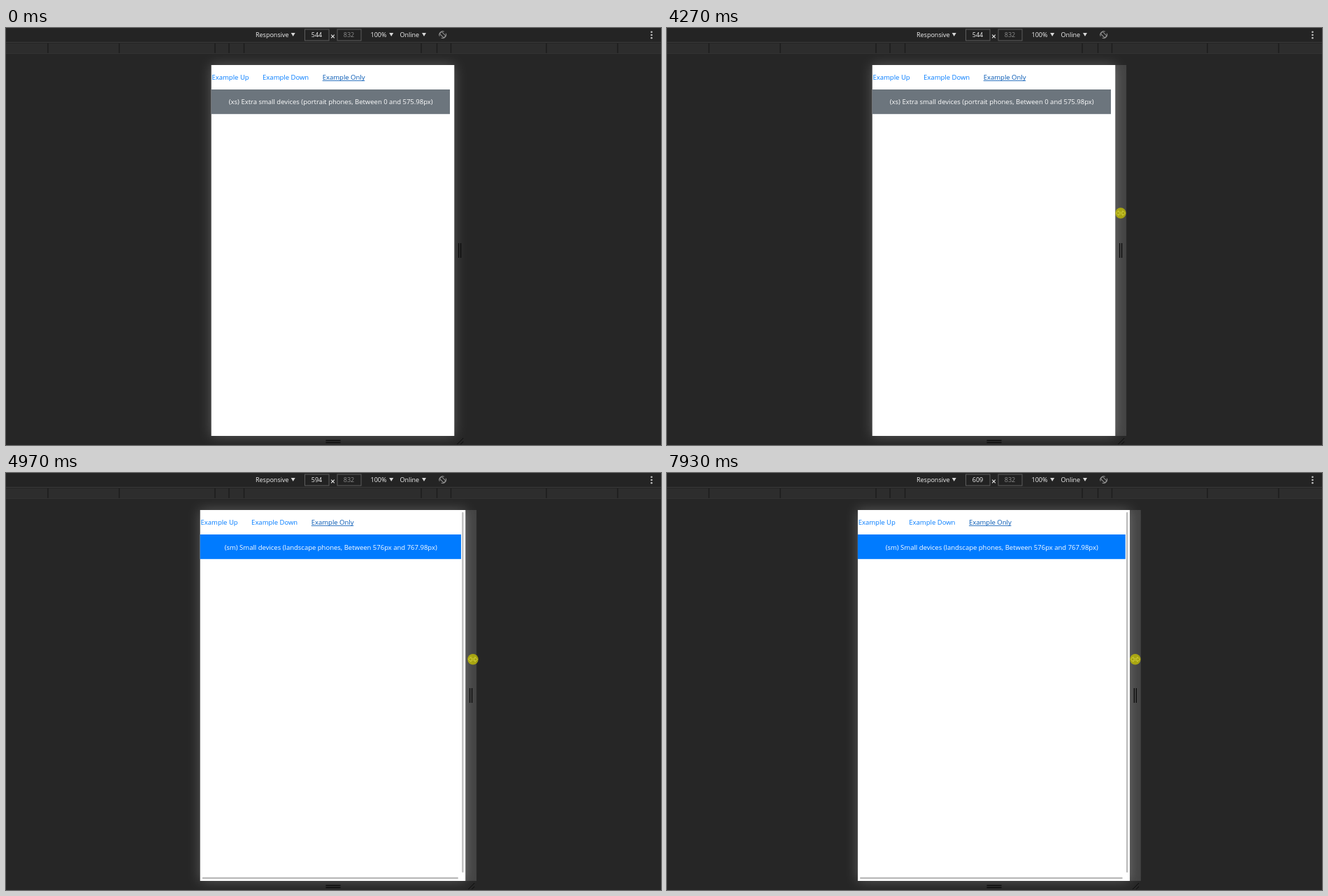
An HTML page for the animation above (8000 ms loop, 937 by 597 pixels).

```html
<!DOCTYPE html>
<html lang="en">
<head>
<meta charset="utf-8">
<title>Responsive breakpoints</title>
<style>
  html, body { margin: 0; width: 100%; height: 100%; overflow: hidden; background: #262626; }
  svg { display: block; width: 100%; height: 100%; }
  text { font: 9.5px "Open Sans", "Noto Sans", sans-serif; }
  .bar text { font-size: 9px; fill: #f2f2f2; }
  .mid { text-anchor: middle; }
  .links text { fill: #007bff; }
  .links .hover { fill: #0056b3; }
  .field { fill: #222; stroke: #5c5c5c; }
  .grip { stroke: #0c0c0c; fill: none; }
  .thumb { fill: #b9b9b9; }
</style>
</head>
<body>
<svg viewBox="0 0 937 597">
  <defs>
    <filter id="blur" filterUnits="userSpaceOnUse" x="200" y="0" width="540" height="650">
      <feGaussianBlur stdDeviation="9"/>
    </filter>
  </defs>
  <rect width="937" height="597" fill="#262626"/>
  <rect id="glow" y="53" height="531" fill="#fff" opacity=".24" filter="url(#blur)"/>

  <g class="bar">
    <rect width="937" height="37" fill="#242424"/>
    <path d="M0 20.5H937" stroke="#3b3b3b"/>
    <rect y="22" width="937" height="14" fill="#2d2d2d"/>
    <path d="M0 36.5H937" stroke="#333"/>
    <path id="ticks" stroke="#1b1b1b" stroke-width="1.3"/>
    <text x="357" y="13.3">Responsive</text>
    <text x="521.5" y="13.3">100%</text>
    <text x="563.5" y="13.3">Online</text>
    <path d="M407.7 7h6l-3 5zM548.2 7h6l-3 5zM595 7h6l-3 5z" fill="#d8d8d8"/>
    <rect class="field" x="427.5" y="2" width="34.5" height="16"/>
    <rect class="field" x="474" y="2" width="34" height="16"/>
    <text id="size" class="mid" x="444.5" y="13.3"></text>
    <text class="mid" x="490.5" y="13.3" style="fill:#8c8c8c">832</text>
    <path d="M465.2 9.7l4.6 4.6m0-4.6l-4.6 4.6" stroke="#e4e4e4" stroke-width="1.2"/>
    <g transform="translate(624.7 9.7)" fill="none" stroke="#9a9a9a">
      <path d="M-4.6 2A5 5 0 0 1 2 -4.6M4.6 -2A5 5 0 0 1 -2 4.6"/>
      <rect x="-2" y="-4.2" width="4" height="8.4" rx=".6" transform="rotate(-45)"/>
    </g>
    <g fill="#c4c4c4">
      <circle cx="923.5" cy="5.8" r="1.3"/><circle cx="923.5" cy="10" r="1.3"/><circle cx="923.5" cy="14.2" r="1.3"/>
    </g>
  </g>

  <g class="grip">
    <path d="M457.5 590.5h21m-21 3h21" stroke-width="1.3"/>
  </g>
  <g id="right">
    <rect id="track" y="53" width="15.8" height="531" fill="#fff" opacity=".13"/>
    <path class="grip" d="M6.3 308v21m3-21v21" stroke-width="1.3"/>
    <path class="grip" d="M4 596l9-9m-4 9l4-4"/>
  </g>

  <rect id="page" y="53" height="531" fill="#fff"/>
  <rect id="alert" y="88" height="35.2"/>
  <text id="label" class="mid" x="464.7" fill="#fff"></text>
  <g id="links" class="links">
    <text x=".8" y="74">Example Up</text>
    <text x="73.4" y="74">Example Down</text>
    <text class="hover" x="159" y="74">Example Only</text>
    <path d="M159 75.5h60.5" stroke="#0056b3" stroke-width=".8"/>
  </g>
  <g id="scroll">
    <rect id="vThumb" class="thumb" y="56" width="2.2" height="516" rx="1.1"/>
    <rect id="hThumb" class="thumb" y="578.8" height="2.2" rx="1.1"/>
  </g>

  <path id="arrow" d="M.5 .5V10.3L2.8 8.2L4.4 11.7L6 11L4.4 7.6H7.5Z" fill="#fff" stroke="#111" stroke-width=".6"/>
  <g id="resize">
    <path d="M-6.5 0L-2.8 -3.4V-1H2.8V-3.4L6.5 0L2.8 3.4V1H-2.8V3.4Z" fill="#2c2c2c" stroke="#fff" stroke-width=".9"/>
    <circle id="press" r="7.7" fill="#c8c400" opacity=".75"/>
  </g>
</svg>
<script>
const LOOP = 8000, SCALE = 0.639, CENTER = 467.5;
const $ = id => document.getElementById(id);
const set = (id, attrs) => {
  for (const name in attrs) $(id).setAttribute(name, attrs[name]);
};
const show = (id, on) => $(id).setAttribute('visibility', on ? 'visible' : 'hidden');
const mix = (a, b, u) => a + (b - a) * u;

$('ticks').setAttribute('d',
  [60, 162, 299, 319, 340.5, 594, 616.5, 636.5, 773, 875].map(x => `M${x} 22v14`).join(''));

// time, viewport width, pointer x, pointer y
const drag = [
  [0, 544, 649, 265],
  [4500, 547, 650, 265],
  [4580, 555, 653, 265.5],
  [4660, 564, 656, 266],
  [4740, 572, 658.8, 266.5],
  [4820, 580, 662, 266.8],
  [4900, 588, 665, 266.8],
  [4970, 594, 668, 266.8],
  [5140, 604, 668, 266.8],
  [7780, 605, 668.6, 266.8],
  [7850, 607, 669.2, 266.8],
  [7930, 609, 669.9, 266.8]
];

// Pointer enters from the right, rests, then settles on the resize handle.
function approach(t) {
  if (t < 1310) {
    const u = Math.min(5, Math.floor((t - 700) / 76)) / 5;
    return [mix(907, 752, u), mix(212, 250, u)];
  }
  const u = Math.min(11, Math.floor((t - 1310) / 79) + 1) / 11;
  const eased = 1 - (1 - u) ** 2;
  return [mix(752, 649, eased), mix(250, 265, eased)];
}

function scrollOpacity(t) {
  if (t < 4500 || (t >= 5670 && t < 7780)) return 0;
  return t >= 5520 && t < 5670 ? 0.5 : 1;
}

function draw(t) {
  let [, size, x, y] = drag.findLast(step => t >= step[0]);
  if (t >= 700 && t < 2100) [x, y] = approach(t);
  const width = size * SCALE, left = CENTER - width / 2, right = left + width;
  const small = size >= 576;
  const onHandle = t >= 1310 && x < 657 || t >= 2100;

  $('size').textContent = size;
  set('glow', { x: left, width });
  set('page', { x: left, width });
  set('alert', { x: left, width: width - 6.3, fill: small ? '#007bff' : '#6c757d' });
  $('label').textContent = small
    ? '(sm) Small devices (landscape phones, Between 576px and 767.98px)'
    : '(xs) Extra small devices (portrait phones, Between 0 and 575.98px)';
  set('label', { y: small ? 109.5 : 109 });
  set('links', { transform: `translate(${left})` });
  set('right', { transform: `translate(${right})` });
  set('vThumb', { x: right - 5 });
  set('hThumb', { x: left + 3, width: width - 13.3 });
  set('scroll', { opacity: scrollOpacity(t) });

  show('track', onHandle);
  show('arrow', t >= 700 && !onHandle);
  show('resize', onHandle);
  show('press', t >= 4270);
  set('arrow', { transform: `translate(${x} ${y})` });
  set('resize', { transform: `translate(${x} ${y})` });
}

const start = performance.now();
function tick() {
  draw((performance.now() - start) % LOOP);
  requestAnimationFrame(tick);
}
tick();
</script>
</body>
</html>
```
